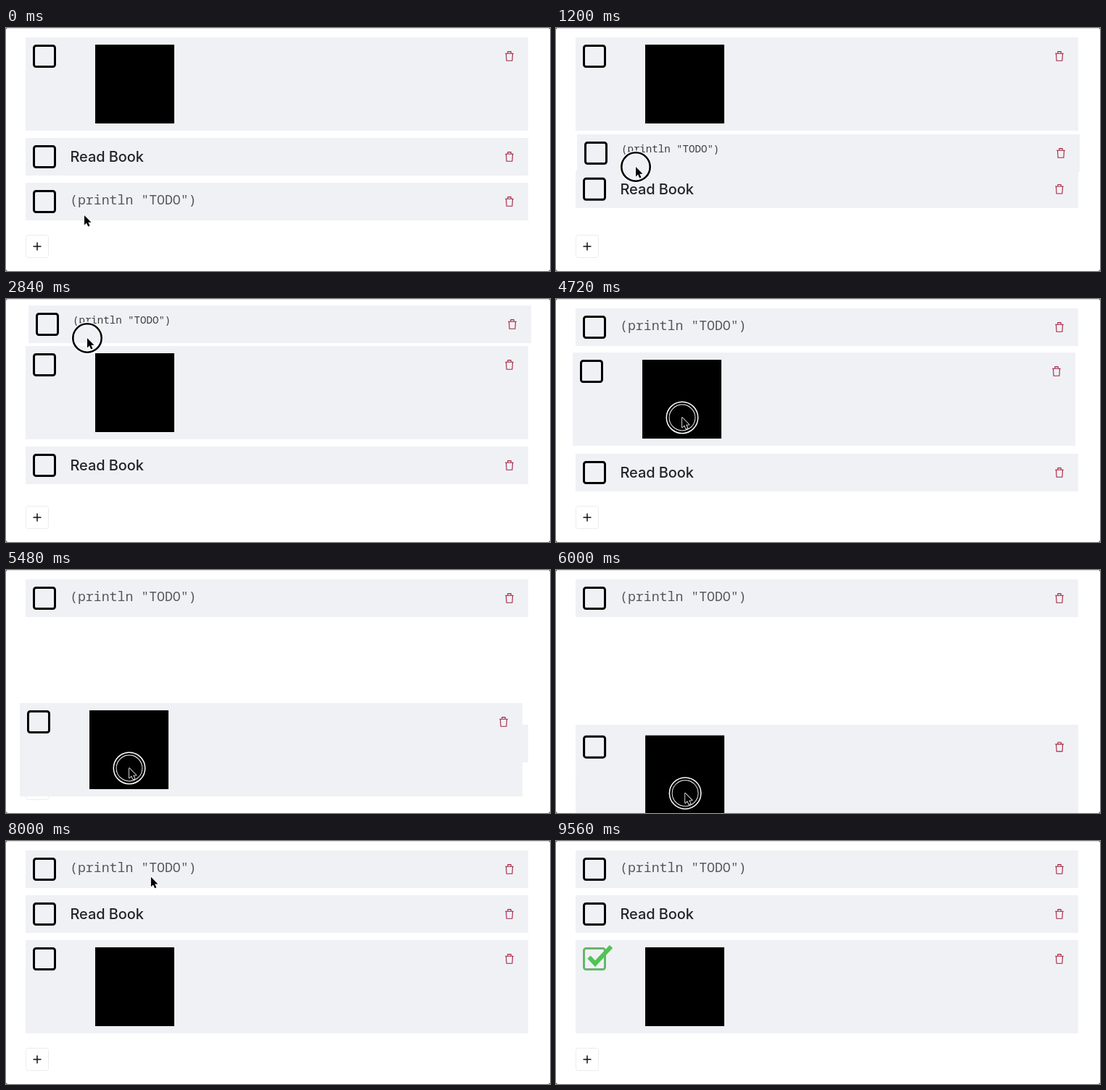
An HTML page that plays this animation: 750x336 px, repeating every 9.6 s.

```html
<!DOCTYPE html>
<html lang="en">
<head>
<meta charset="utf-8">
<title>Sortable list</title>
<style>
html, body { margin: 0; width: 100%; height: 100%; overflow: hidden; background: #fff; }
svg { display: block; width: 750px; height: 336px; }
.title { font: 500 20px Inter, sans-serif; letter-spacing: -0.1px; fill: #222428; }
.code { font: 400 18.2px "Noto Sans Mono", monospace; fill: #55575c; white-space: pre; }
.code.small { font-size: 14.1px; font-weight: 300; fill: #3c3e42; }
</style>
</head>
<body>
<svg viewBox="0 0 750 336" xmlns="http://www.w3.org/2000/svg">
  <defs>
    <rect id="box" x="11.5" y="11.5" width="29" height="29" rx="3" fill="none" stroke-width="3"/>
    <path id="trash" d="M661.2 22.2h11.6M664.8 22v-2.4h4.4v2.4M662.5 22.4l.6 9.8h7.8l.6-9.8"
      fill="none" stroke="#a3243f" stroke-width="1.1" stroke-linejoin="round"/>
  </defs>
  <rect width="750" height="336" fill="#444"/>
  <rect width="750" height="336" rx="3" fill="#fff"/>
  <path d="M3 .5H747" stroke="#ddd"/>

  <g fill="none">
    <rect x="27.5" y="286.5" width="31" height="31" rx="3" fill="#fff" stroke="#ececef"/>
    <path d="M37.5 302h11M43 296.5v11" stroke="#111" stroke-width="1.5"/>
  </g>

  <g id="rows">
    <g id="book">
      <rect width="693" height="52" fill="#f0f1f5"/>
      <use href="#box" stroke="#000"/>
      <text class="title" x="61.5" y="33">Read Book</text>
      <use href="#trash"/>
    </g>
    <g id="image">
      <rect width="693" height="129" fill="#f0f1f5"/>
      <use id="imageBox" href="#box" stroke="#000"/>
      <path id="check" d="M18.5 23.5L27 32.5L49 9" fill="none" stroke="#4fc454" stroke-width="6"/>
      <rect x="96" y="10" width="109" height="109"/>
      <use href="#trash"/>
    </g>
    <g id="print">
      <rect width="693" height="52" fill="#f0f1f5"/>
      <use href="#box" stroke="#000"/>
      <text id="code" class="code" x="61" y="30">(println "TODO")</text>
      <use href="#trash"/>
    </g>
  </g>

  <g id="pointer">
    <g id="ring" fill="none">
      <circle r="20" stroke="#fff" stroke-width="5"/>
      <circle r="19.7" stroke="#000" stroke-width="2.6"/>
    </g>
    <path d="M0 0V13.4L3 10.6L5.2 15.4L7.5 14.4L5.3 9.7H9.5Z" fill="#000"
      stroke="#fff" stroke-width="1.6" paint-order="stroke" stroke-linejoin="round"/>
  </g>
</svg>
<script>
const LOOP = 9600, STEP = 40, SLIDE = 400, DROP = 200;
const LEFT = 27, TOP = 13, GAP = 10, LOW = 52, TALL = 129;
const SECOND = TOP + LOW + GAP;
const $ = id => document.getElementById(id);

// Turning points of the pointer: time, x, y.
const path = [
  [80, 108, 259], [720, 86, 235], [1200, 110, 192], [2340, 112, 54], [2880, 112, 54],
  [3560, 174, 264], [4040, 178, 165], [4200, 178, 165], [4720, 174, 164], [5160, 161, 231],
  [5480, 170, 274], [5960, 178, 309], [6640, 179, 278], [7500, 179, 278],
  [7760, 246, 170], [8080, 180, 35], [8680, 48, 163], [9080, 48, 163], [9560, 88, 93]
];
const printDrag = { press: 80, release: 2880, from: SECOND + TALL + GAP, to: TOP };
const imageDrag = { press: 4200, release: 6920, from: SECOND, to: SECOND + LOW + GAP };
const click = { press: 8760, release: 8920 };

const held = (t, { press, release }) => t >= press && t < release;
const ramp = (t, start, span) => Math.min(1, Math.max(0, (t - start) / span));
const mix = (a, b, p) => a + (b - a) * p;

// Smooth curve through the turning points that never overshoots them.
function along(t, axis) {
  const last = path.length - 1;
  const n = path.findIndex(k => k[0] > t);
  if (n <= 0) return path[n ? last : 0][axis];
  const slope = k => k < 0 || k >= last ? 0
    : (path[k + 1][axis] - path[k][axis]) / (path[k + 1][0] - path[k][0]);
  const tangent = k => {
    const a = slope(k - 1), b = slope(k);
    return a * b <= 0 ? 0 : 2 * a * b / (a + b);
  };
  const a = path[n - 1], b = path[n], span = b[0] - a[0];
  const u = (t - a[0]) / span, v = 1 - u;
  return a[axis] * (1 + 2 * u) * v * v + tangent(n - 1) * span * u * v * v
    + b[axis] * u * u * (3 - 2 * u) - tangent(n) * span * u * u * v;
}
const pointer = t => [along(t, 1), along(t, 2)];

// A row follows the pointer while held, then drops into its new place.
function dragged(t, { press, release, from, to }) {
  const [x0, y0] = pointer(press);
  const [x, y] = pointer(Math.min(release, Math.max(press, t)));
  const p = ramp(t, release, DROP);
  return [mix(LEFT + x - x0, LEFT, p), mix(from + y - y0, to, p)];
}

// A row making room for the dragged one.
function slide(t, start, from, to) {
  const p = ramp(t, start, SLIDE);
  return [LEFT, mix(from, to, p < 0.5 ? 2 * p * p : 1 - 2 * (1 - p) ** 2)];
}

const place = (id, [x, y]) =>
  $(id).setAttribute("transform", `translate(${x.toFixed(2)} ${y.toFixed(2)})`);
const show = (id, on) => $(id).setAttribute("visibility", on ? "visible" : "hidden");

let front = "print";
function draw(t) {
  const dropped = t >= printDrag.release + DROP;
  const below = TOP + TALL + GAP;
  place("print", dragged(t, printDrag));
  place("image", dropped ? dragged(t, imageDrag) : slide(t, 1460, TOP, TOP + LOW));
  place("book", dropped ? slide(t, 6352, below + LOW + GAP, SECOND)
    : slide(t, 905, below, below + LOW));

  const upper = dropped ? "image" : "print";
  if (upper !== front) $("rows").append($(front = upper));

  const small = t >= printDrag.press && !dropped;
  $("code").setAttribute("class", small ? "code small" : "code");
  $("code").setAttribute("y", small ? 25 : 30);

  const checked = t >= click.release;
  $("imageBox").setAttribute("stroke", checked ? "#68b66b" : "#000");
  show("check", checked);

  const visible = t < LOOP - STEP;
  place("pointer", pointer(t));
  show("pointer", visible);
  show("ring", visible && [printDrag, imageDrag, click].some(d => held(t, d)));
}

const begin = performance.now();
function tick() {
  const t = (performance.now() - begin) % LOOP;
  draw(Math.floor(t / STEP) * STEP);
  requestAnimationFrame(tick);
}
tick();
</script>
</body>
</html>
```
